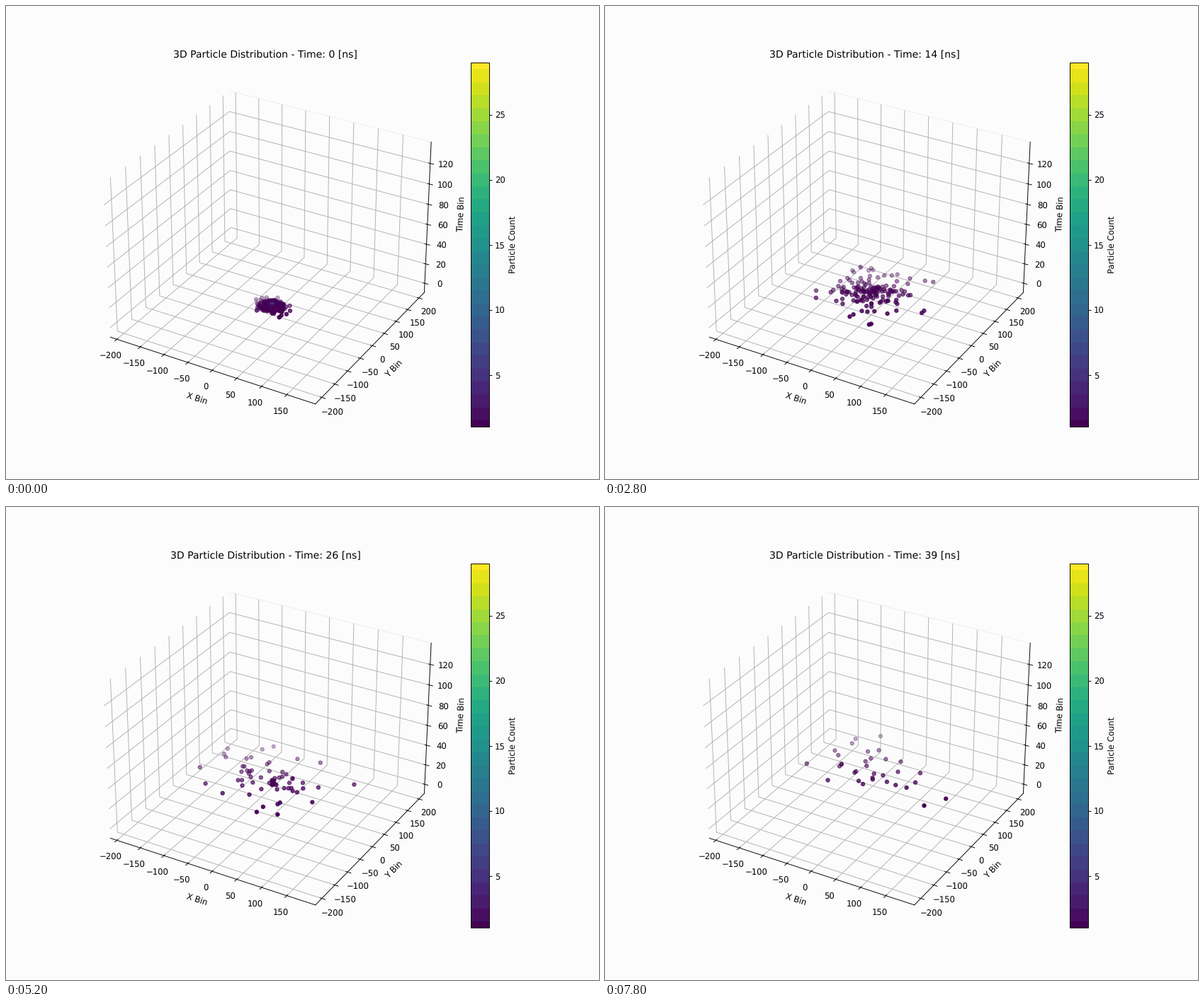
A matplotlib script that plays this animation: 837 by 669 pixels, repeating every 8000 ms.

```python
import numpy as np
import matplotlib.pyplot as plt
from matplotlib.animation import FuncAnimation
from matplotlib.cm import ScalarMappable
from matplotlib.colors import ListedColormap, Normalize

W, H, DPI = 837, 669, 83.7
STEPS, STEP_MS = 40, 200
BG = "#fcfcfc"
LOW, HIGH = 1, 29

plt.rcParams["text.hinting"] = "none"


def banded_viridis(size=560):
    """Viridis in flat bands, one per whole count."""
    counts = np.rint(np.linspace(LOW, HIGH, size))
    return ListedColormap(plt.cm.viridis((counts - LOW) / (HIGH - LOW)))


fig = plt.figure(figsize=(W / DPI, (H + 1e-6) / DPI), dpi=DPI, facecolor=BG)
ax = fig.add_subplot(projection="3d", facecolor=BG)
ax.set(xlim=(-214, 206), ylim=(-224.3, 224.3), zlim=(-9.55, 140.55),
       xticks=range(-200, 151, 50), yticks=range(-200, 201, 50),
       zticks=range(0, 121, 20),
       xlabel="X Bin", ylabel="Y Bin", zlabel="Time Bin")
for axis in (ax.xaxis, ax.yaxis, ax.zaxis):
    axis.set_pane_color(BG)
ax.yaxis.pane.set_edgecolor("#f0f0f0")
fig.colorbar(ScalarMappable(Normalize(LOW, HIGH), banded_viridis()),
             ax=ax, label="Particle Count")


def hits(t):
    """Occupied bins and their counts: the shower thins out as it widens."""
    rng = np.random.default_rng(100 + t)
    n = round(430 * np.exp(-t / 12) + 16 + 350 * np.exp(-t))
    mean = 8 + 11.4 * t ** 0.5
    shape = 2 - 0.6 * np.exp(-t)
    r = rng.gamma(shape, mean / shape, 2 * n)
    r = r[r < 45 + 22 * t ** 0.5][:n]
    a = rng.uniform(0, 2 * np.pi, len(r))
    xy = np.column_stack([r * np.cos(a), r * np.sin(a)])
    return np.unique(np.rint(xy), axis=0, return_counts=True)


def show(t):
    for cloud in list(ax.collections):
        cloud.remove()
    bins, counts = hits(t)
    ax.scatter(bins[:, 0], bins[:, 1], np.full(len(bins), t), c=counts,
               cmap="viridis", vmin=LOW, vmax=HIGH)
    ax.set_title(f"3D Particle Distribution - Time: {t} [ns]")


anim = FuncAnimation(fig, show, frames=STEPS, interval=STEP_MS,
                     init_func=lambda: None, repeat=True, repeat_delay=0)
plt.show()
```
